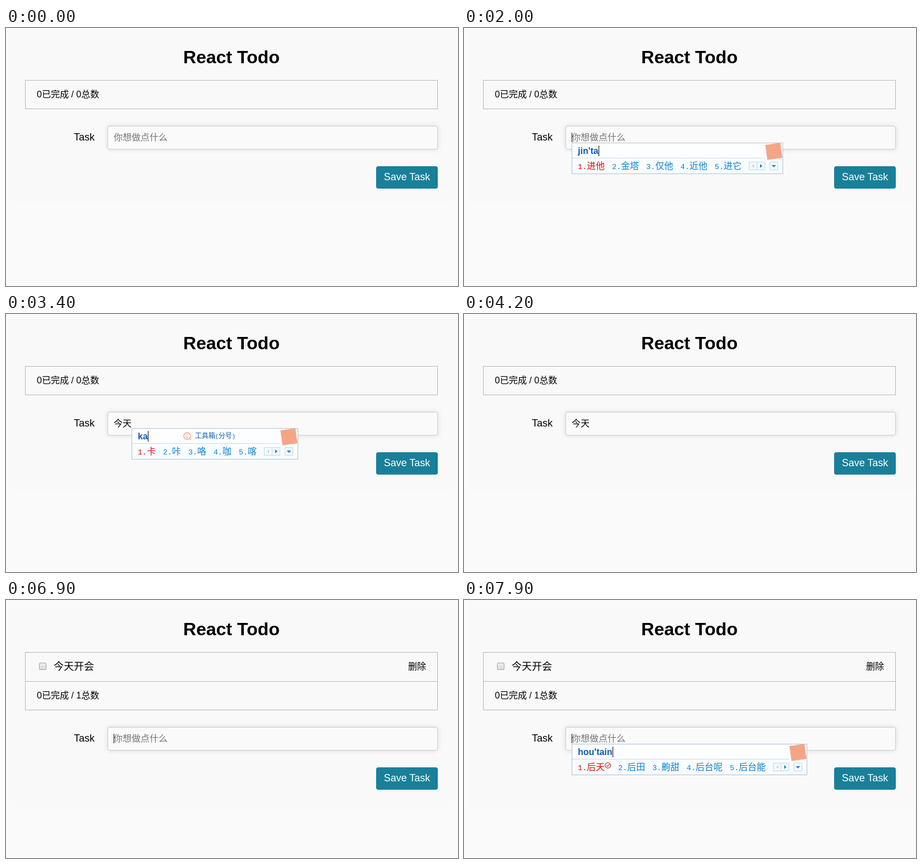
Recreate the animation shown at these times as an HTML page. Size 806x461 px, loop 8000 ms.

```html
<!DOCTYPE html>
<html lang="zh-CN">
<head>
<meta charset="utf-8">
<title>React Todo</title>
<style>
  html, body { margin: 0; width: 100%; height: 100%; overflow: hidden; background: #fafafa; }
  body { position: relative; font: 16px/17px "Liberation Sans", "Noto Sans CJK SC", "Noto Sans CJK", sans-serif; color: #000; }
  body div { position: absolute; box-sizing: border-box; white-space: pre; }
  svg { display: block; }
  #card { left: 6px; top: 3px; width: 794px; height: 314px; background: #f9f9f9; }
  #title { left: 0; width: 804px; top: 34px; text-align: center; font-size: 32px; line-height: 36px; font-weight: bold; }
  #list { left: 34px; top: 93px; width: 736px; height: 52px; border: 1px solid #b8b8b8; }
  #item { left: 34px; top: 93px; width: 736px; height: 53px; border-bottom: 1px solid #b8b8b8; }
  #box { left: 25px; top: 19px; width: 13px; height: 13px; border: 1px solid #a3a3a3; border-radius: 2px; background: linear-gradient(#eee, #dcdcdc); }
  #name { left: 51px; top: 16px; font-size: 18px; line-height: 20px; }
  #remove { left: 683px; top: 17px; }
  #lower { left: 0; top: 0; width: 806px; height: 461px; }
  #count { left: 55px; top: 110px; }
  #label { left: 121px; top: 185px; font-size: 18px; line-height: 20px; }
  #input { left: 181px; top: 175px; width: 589px; height: 42px; border: 1px solid #ccc; border-radius: 4px; background: #fafafa; box-shadow: 0 0 8px rgba(40, 70, 100, .16); }
  #text { left: 192px; top: 187px; }
  #caret { top: 187px; width: 1px; height: 17px; background: #000; }
  #save { left: 660px; top: 247px; width: 110px; height: 40px; border-radius: 4px; background: #19809a; color: #fff; font-size: 18px; line-height: 38px; text-align: center; }
  #popup { height: 56px; display: flex; align-items: flex-start; gap: 13px; padding: 0 8px 0 10px; border: 1px solid #adc3d4; background: linear-gradient(#fff, #f7fbff); color: #0a82d2; }
  #popup span { margin-top: 32px; font-weight: 300; }
  #popup span:first-of-type { color: #e00d0d; }
  #popup span svg { display: inline-block; vertical-align: 3px; }
  #popup small { font-size: 14px; line-height: 0; }
  #popup > svg { margin-top: 33px; }
  b { font: 400 .8333em/0 "Liberation Mono", monospace; }
  .typed { left: 10px; top: 4px; line-height: 19px; font-weight: bold; color: #0c5bb9; border-right: 1px solid #000; }
  .rule { left: 0; right: 31px; top: 26px; height: 1px; background: #cbdbe7; }
  .badge { right: 2px; top: 1px; width: 27px; height: 27px; background: #f5a586; transform: rotate(-8deg); }
  #tip { left: 316px; top: 211px; display: flex; gap: 6px; font-size: 12px; line-height: 14px; color: #0b5cab; }
  .link { text-decoration: underline; }
</style>
</head>
<body>
<div id="card"></div>
<div id="title">React Todo</div>
<div id="list"></div>
<div id="item"><div id="box"></div><div id="name">今天开会</div><div id="remove">删除</div></div>
<div id="lower">
  <div id="count"></div>
  <div id="label">Task</div>
  <div id="input"></div>
  <div id="text"></div>
  <div id="caret"></div>
  <div id="save">Save Task</div>
  <div id="popup"></div>
  <div id="tip"></div>
</div>
<script>
const LOOP = 8000, SUBMIT = 4900, ROW = 52;

// Each list holds [start time, values...]; the latest started entry applies.
const typedText = [[0, ''], [2600, '今天'], [4300, '今天开会'], [SUBMIT, '']];
const caretOn = [[0, 0], [900, 1], [1400, 0], [1900, 1], [2400, 0], [2600, 1], [3100, 0], [3600, 1],
  [4100, 0], [4300, 1], [4700, 0], [4900, 1], [5400, 0], [5900, 1], [6400, 0], [6900, 1], [7400, 0], [7900, 1]];
const pinyin = [
  [0],
  [1700, 'ji', '及 即 机 级 急'],
  [1800, 'jin', '进 仅 近 金 尽'],
  [1900, "jin't", '今天 仅通 进退 金条 近体'],
  [2000, "jin'ta", '进他 金塔 仅他 近他 进它'],
  [2100, "jin'tai", '金台 今台 进台 近台 金太'],
  [2200, "jin'tain", '今天✓ 惊(jing)天 米朵 金泰呢 今台南'],
  [2600],
  [2800, 'k', '看 可 快 卡 开'],
  [2900, 'ka', '卡 咔 咯 咖 喀'],
  [3500, 'kai', '开 凯 揩 慨 楷'],
  [3600, "kai'h", '开会 开花 开户 开后 开好'],
  [3700, "kai'hu", '开户 开花 开湖 开壶 开胡'],
  [3800, "kai'hui", '开会 开回 开挥 开汇 开'],
  [4200],
  [7300, 'ho', '后 和 好 猴 吼'],
  [7400, 'hou', '后 候 厚 猴 吼'],
  [7500, "hou't", '后天 后台 后头 后退 后腿'],
  [7600, "hou'ta", '后他 后她 后塔 后它 猴他'],
  [7700, "hou'tai", '后台 后太 后抬 厚台 猴台'],
  [7900, "hou'tain", '后天✓ 后田 齁甜 后台呢 后台能'],
];
const tips = [
  [0],
  [2500, '6.米朵的小站：t.sina.com.cn', .12, 'link'],
  [2600],
  [3300, '工具箱(分号)', .12, ''],
  [3400, '工具箱(分号)', 1, ''],
  [3500],
];

const tick = `<svg width="11" height="11" fill="none" stroke="#e00d0d" stroke-width="1.1">
  <circle cx="5.5" cy="5.5" r="4.8"/><path d="M3 5.3l2 2 3.3-3.8"/></svg>`;
const pager = `<svg width="52" height="15"><g fill="#f4f9fd" stroke="#c2d8e8">
  <path d="M.5.5h28v14h-28zM14.5.5v14M37.5.5h14v14h-14z"/></g>
  <path d="M9 4.5v6l-3-3z" fill="#b5c9da"/><path d="M20 4v7l4-3.5zM40.500 6h8l-4 4z" fill="#1583cf"/></svg>`;
const info = opacity => `<svg width="15" height="15" fill="none" stroke="#f2a184" stroke-width="1.4" opacity="${opacity}">
  <circle cx="7" cy="7" r="6"/><path d="M7 3.300v1.500M7 6v5M11.500 11.500l2.500 2"/></svg>`;

const el = id => document.getElementById(id);
const at = (steps, t) => steps.findLast(step => step[0] <= t);
const show = (node, visible) => { node.style.display = visible ? '' : 'none'; };
const mono = s => s.replace(/[!-~]+/g, '<b>$&</b>');

const candidate = (word, i) => `<span><b>${i + 1}.</b>${
  word.replace(/\(.*\)/, '<small>$&</small>').replace('✓', tick)}</span>`;

const popupHtml = (keys, words) => `<div class="typed">${keys}</div><div class="rule"></div>` +
  words.split(' ').map(candidate).join('') + pager + '<div class="badge"></div>';

function render(t) {
  const text = at(typedText, t)[1];
  const saved = t >= SUBMIT;
  const shift = saved ? ROW : 0;
  const textEnd = 192 + 16 * text.length;

  el('card').style.height = 314 + shift + 'px';
  el('list').style.height = 52 + shift + 'px';
  el('lower').style.top = shift + 'px';
  show(el('item'), saved);
  el('count').textContent = `0已完成 / ${saved ? 1 : 0}总数`;

  el('text').textContent = text || '你想做点什么';
  el('text').style.color = text ? '#000' : '#757575';
  el('caret').style.left = textEnd + 'px';
  show(el('caret'), at(caretOn, t)[1]);

  const [, keys, words] = at(pinyin, t);
  const popup = el('popup');
  show(popup, keys);
  popup.style.left = textEnd + 'px';
  popup.style.top = (text ? 204 : 205) + 'px';
  popup.innerHTML = keys ? popupHtml(keys, words) : '';

  const [, tip, opacity, style] = at(tips, t);
  show(el('tip'), tip);
  el('tip').innerHTML = tip ? `${info(opacity)}<span class="${style}">${mono(tip)}</span>` : '';
}

// Everything changes on a 100 ms grid, so redraw only when a new step begins.
let start, lastStep;
function frame(now) {
  start ??= now;
  const step = Math.floor((now - start) % LOOP / 100);
  if (step !== lastStep) render(step * 100);
  lastStep = step;
  requestAnimationFrame(frame);
}
render(0);
requestAnimationFrame(frame);
</script>
</body>
</html>
```
